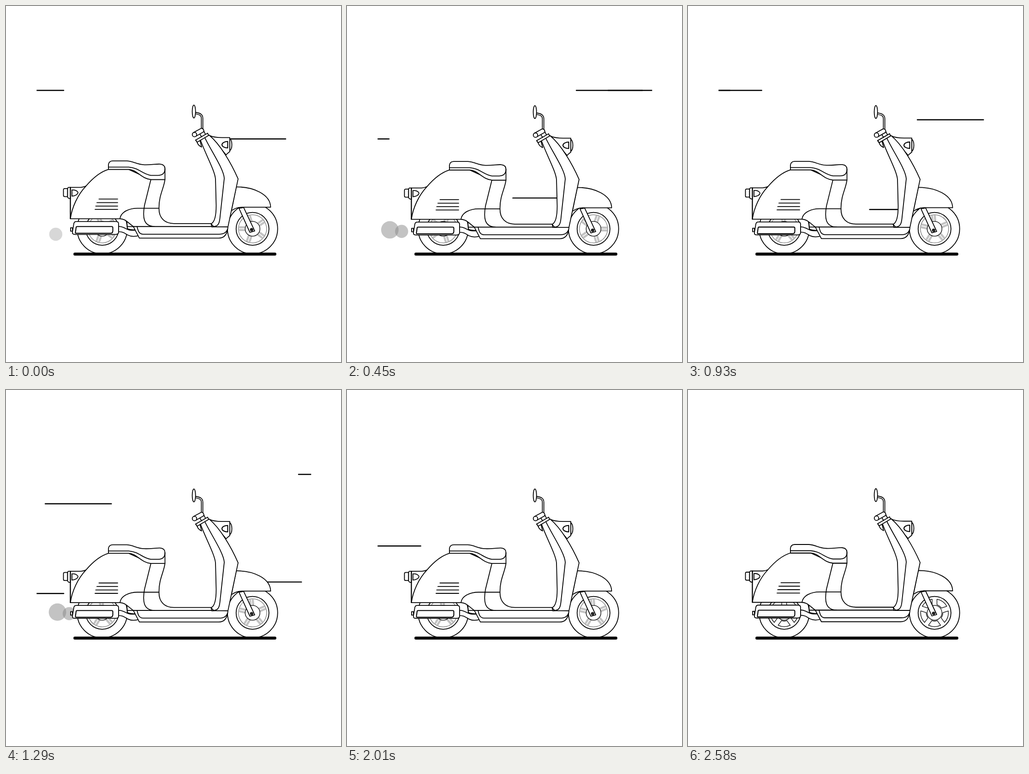
An HTML page for the animation above (4200 ms loop, 726 by 772 pixels).

```html
<!DOCTYPE html>
<html lang="en">
<head>
<meta charset="utf-8">
<title>Scooter ride</title>
<style>
html, body { margin: 0; width: 100%; height: 100%; overflow: hidden; background: #fff; }
svg { display: block; width: 100vw; height: 100vh; }
.ink { fill: #fff; stroke: #000; stroke-width: 1.8; stroke-linejoin: round; stroke-linecap: round; }
.thin { stroke-width: 1.3; }
.line { fill: none; }
</style>
</head>
<body>
<svg viewBox="0 0 726 772">
  <clipPath id="view"><rect x="66.3" y="150" width="595" height="420"/></clipPath>
  <g clip-path="url(#view)">
    <g id="wind" stroke="#000" stroke-width="2.4" stroke-linecap="round"></g>
    <g id="smoke" fill="#888"></g>
  </g>
  <g id="rear" transform="translate(208.5 483.2)"></g>
  <g id="front" transform="translate(534.3 483.2)"></g>
  <path d="M149.3 538H582.7" stroke="#000" stroke-width="6.4" stroke-linecap="round"/>

  <g id="bike" class="ink">
    <!-- exhaust pipe -->
    <path d="M244 477C257 477 260 485.5 272 485.5H286L288 497C281 499 271 499.5 264 496C257 492 254 488.5 244 488.5Z"/>
    <!-- tail lamp -->
    <path d="M139.5 392.5H162Q169 392 175 389V440L139.5 460Z"/>
    <path d="M133.5 395H127Q124.5 395 124.5 398V409.5Q124.5 412.5 127 412.5H133.5Z"/>
    <path d="M139.5 392.5H135.5Q133.5 393 133.5 396V413Q134 416.5 139.5 417Z"/>
    <!-- rear body and tunnel -->
    <path d="M139.5 460.5C143 436 155 409 173 390C190 370 207 358 222 353.5H266L314 375.5H344.5C342 395 331.5 409 331.5 437C331 460 345 471 364 471H447L464 477.5H276C264 469 259 461 247 460.5Z"/>
    <path class="line" d="M139.5 392.5V460.5M314 375.5L300 432C296 456 297 477 322 477.5M247 460.5C249 445 268 437.8 285 437.8H331.5M262 467.5L263 482M263 477.5H276M263 482C268 484 276 485 284 484.5"/>
    <path d="M143 398H147C153 399 156 402 156 404.5C155 408 150 411 143 411.5Z"/>
    <path class="line" d="M201.5 417.8H242M197 425.5H242M194.5 433H242M193 440.3H242"/>
    <!-- floor -->
    <path d="M276 477.5H464L481 478C480 492 475 502.5 461 502.5H289Z"/>
    <path class="line" d="M284 477.5C286 486 288 494 297 494H462C472 494 478 490 480 483"/>
    <!-- front fender and fork -->
    <path d="M505 438L528.5 490L539 487L515 436Z"/>
    <circle cx="532.3" cy="484.3" r="2.6"/><circle cx="532.3" cy="484.3" r=".7"/>
    <path d="M499 391.5C535 391 573 407 573.5 435.5H511C500 436 495 439 488.5 443Z"/>
    <!-- head lamp -->
    <path d="M441 280C450 284 460 284.5 468 284.5H485V315C482 317 479 320 477 322Z"/>
    <path d="M485 287C491 291 491 309 485 313Z"/>
    <path d="M480.5 293V307C473 307 468 303.5 468 300C468 296 474 293 480.5 293Z" stroke-width="2.1"/>
    <!-- leg shield -->
    <path d="M421 289L440 279C465 300 488 340 503 374L481 478H446L444.5 471.5C452 468 455.5 455 455.5 432L454 374C452 355 433 322 421 289Z"/>
    <path class="line" d="M431 285C445 314 472 353 473 373L463.5 460C462 474 458 477.5 446 478M444.5 471.5L450 477.5"/>
    <!-- steering -->
    <path d="M411 290L419 286L424 305C415 301 415 296 414 294.5Z"/>
    <path d="M411 290L437 275L439 280L414.5 294.5Z"/>
    <path d="M420 277L424 283M429 271L432 277" class="line"/>
    <path class="line" d="M411 231.5C420 233 425 235 425 243V266" stroke-width="5"/>
    <path class="line" d="M410 231.5C420 233 425 235 425 243V267" stroke="#fff" stroke-width="1.6"/>
    <ellipse cx="407.2" cy="228" rx="3.6" ry="14"/>
    <path d="M406 273.8L423 264.5C427 264 429.5 268 428.5 272L411 282Z"/>
    <circle cx="408.5" cy="278" r="4.8"/>
    <!-- seat -->
    <path d="M222 353.5V343Q223 335.5 231 335H262C278 336 282 343 300 343.5C315 344 325 341.5 334 342Q344.5 343 344.5 352V375.5H314C293 374 284 354 266 353.5Z"/>
    <path class="line" d="M222 348.5H266C288 350 296 364 314 366.5H330Q344.5 366 344.5 352"/>
    <!-- muffler -->
    <path d="M144 480H140V487.5H144Z"/>
    <path d="M152 466.5H239Q244 466.5 244 472V489Q244 494.5 238 494.5H149Q143 494.5 144 489L147 471Q148 466.5 152 466.5Z"/>
    <path d="M154 477.5H229Q231.5 477.5 231.5 480V487Q231 492 227 492H152Q150 492 150.5 490L152 479Q152.3 477.5 154 477.5Z" stroke-width="2.1"/>
  </g>
</svg>
<script>
const LOOP = 4200, STEP = 30, REST = 2580, BRAKE = 2130;
const SPEED = 1.1444, LENGTH = 143.3;
const $ = id => document.getElementById(id);

function add(parent, tag, attrs) {
  const el = document.createElementNS("http://www.w3.org/2000/svg", tag);
  set(el, attrs);
  return parent.appendChild(el);
}
function set(el, attrs) {
  for (const k in attrs) el.setAttribute(k, attrs[k]);
}

// [height, time, left end at that time]
const gusts = [
  [183, 0, -18.3], [288.2, 0, 462.7], [183, 450, 497], [183, 450, 565.7],
  [416.4, 450, 359.5], [246.8, 930, 497], [441.3, 930, 393.7],
  [416.4, 1290, 497], [183, 1290, 634], [338.3, 1710, 359.7]
].map(([y, t, x]) => ({ t, x, el: add($("wind"), "line", { y1: y, y2: y }) }));

// [birth, life, start height, fall per ms, is a pair]
const puffs = [
  [-290, 510, 486, .031, 0], [250, 670, 484, .0238, 1],
  [1250, 670, 484, .0238, 1], [1705, 290, 486, .031, 0]
].map(([born, life, y, fall, pair]) => ({
  born, life, y, fall,
  small: add($("smoke"), "circle", {}),
  big: pair ? add($("smoke"), "circle", {}) : null
}));

const polar = (r, deg) => {
  const a = deg * Math.PI / 180;
  return (r * Math.cos(a)).toFixed(2) + " " + (r * Math.sin(a)).toFixed(2);
};

function makeWheel(id) {
  const g = $(id);
  for (const r of [54.4, 35.6]) add(g, "circle", { r, class: "ink" });
  const spin = add(g, "g", {});
  const blur = add(spin, "g", { fill: "none" });
  const cells = add(spin, "g", { class: "ink thin" });
  add(blur, "circle", { r: 30.5, stroke: "#555", "stroke-width": 1 });
  for (let a = -90; a < 270; a += 72) {
    for (const y of [-3, 3])
      add(blur, "path", { d: `M16 ${y}H30`, stroke: "#c2c2c2", "stroke-width": 4.4, transform: `rotate(${a})` });
    const m = a + 36;
    add(cells, "path", {
      d: `M${polar(18, m - 19)}L${polar(30, m - 26)}A30 30 0 0 1 ${polar(30, m + 26)}` +
         `L${polar(18, m + 19)}A18 18 0 0 0 ${polar(18, m - 19)}Z`
    });
  }
  add(g, "circle", { r: 16, class: "ink thin" });
  return { spin, blur, cells };
}
const wheels = [makeWheel("rear"), makeWheel("front")];

function drawPuff(p, t) {
  const age = t - p.born;
  const grow = Math.max(0, Math.min(1, (age + 200) / 200));
  const alpha = age > p.life ? 0 : Math.min(.5, .5 * (p.life - age) / (p.life * .64));
  const cx = 141.7 - .1167 * age, cy = p.y + p.fall * age;
  set(p.small, { cx, cy, r: 14.2 * grow, "fill-opacity": alpha });
  if (p.big) set(p.big, { cx: cx - 25.5, cy: cy - 3.3, r: 18.9 * grow, "fill-opacity": alpha });
}

function draw(time) {
  const t = Math.min(REST, Math.floor(time % LOOP / STEP) * STEP);
  const stop = Math.max(0, (t - BRAKE) / (REST - BRAKE));

  for (const g of gusts) {
    const x = g.x - SPEED * (t - g.t);
    set(g.el, { x1: x, x2: x + LENGTH });
  }
  for (const p of puffs) drawPuff(p, t);

  const bob = (1 - stop) * (1.4 - .8 * Math.cos(2 * Math.PI * (t - 75) / 630));
  set($("bike"), { transform: `translate(0 ${bob.toFixed(3)})` });

  // one turn in 900 ms, then a coast to a whole number of spokes
  const turn = .4 * (Math.min(t, BRAKE) - BRAKE) - 101 * (1 - stop) ** 2;
  const sharp = Math.max(0, (stop - .6) / .4);
  for (const w of wheels) {
    set(w.spin, { transform: `rotate(${turn.toFixed(2)})` });
    set(w.blur, { opacity: 1 - sharp });
    set(w.cells, { opacity: sharp });
  }
}

const start = performance.now();
function tick() {
  draw(performance.now() - start);
  requestAnimationFrame(tick);
}
draw(0);
requestAnimationFrame(tick);
</script>
</body>
</html>
```
